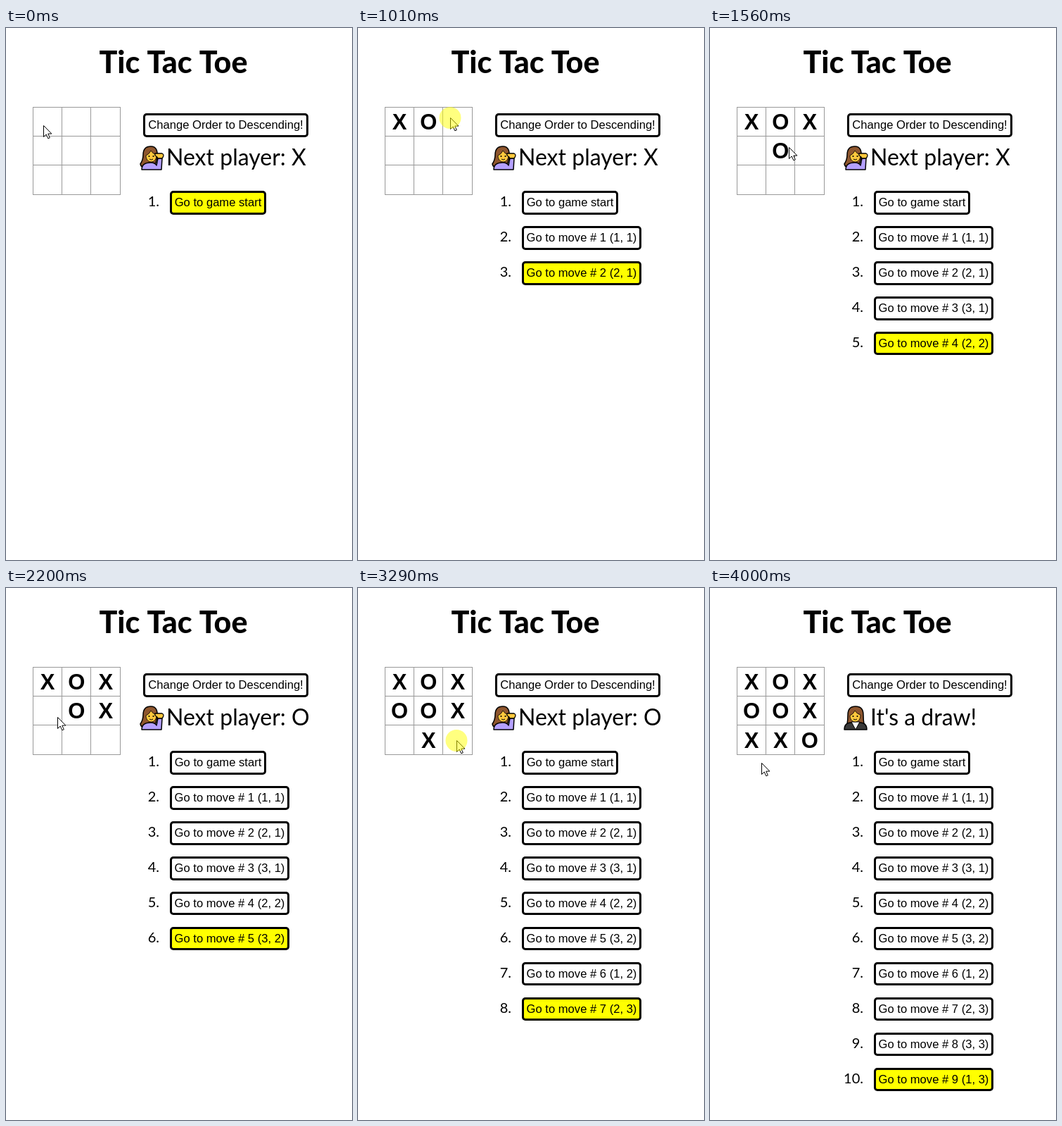
Recreate the animation shown at these times as an HTML page with a canvas. Size 492x755 px, loop 4070 ms.

```html
<!DOCTYPE html>
<html lang="en">
<head>
<meta charset="utf-8">
<title>Tic Tac Toe</title>
<style>
  html, body { margin: 0; width: 100%; height: 100%; overflow: hidden; background: #fff; }
  canvas { display: block; }
</style>
</head>
<body>
<canvas id="stage" width="492" height="755"></canvas>
<script>
const ctx = document.getElementById('stage').getContext('2d');
const LOOP = 4070, TICKS = 52, HOLD = 2, CELL = 41.4;
const ROUND = '"Century Gothic", Lato, sans-serif';
const PLAIN = 'Arial, "Liberation Sans", sans-serif';

// Pointer stops; a press holds the pointer still and plays the cell under it
const stop = (tick, x, y) => ({ tick, x, y, leave: tick });
const press = (tick, x, y) => ({
  tick, x, y, leave: tick + HOLD,
  col: Math.floor((x - 38) / CELL), row: Math.floor((y - 112) / CELL)
});
const stops = [
  stop(0, 53, 138),
  press(2, 62, 138), press(8, 105, 135), press(12, 131, 127),
  press(17, 107, 168), press(23, 138, 172),
  stop(28, 73, 183),
  press(31, 57, 175), press(36, 98, 214), press(41, 140, 216), press(47, 57, 216),
  stop(51, 73, 248)
];
const moves = stops.filter(s => s.leave > s.tick);

function pointerAt(tick) {
  const i = Math.max(1, stops.findIndex(s => s.tick >= tick));
  const a = stops[i - 1], b = stops[i];
  const u = Math.max(0, (tick - a.leave) / (b.tick - a.leave));
  const k = u * u * (3 - 2 * u);
  return [Math.round(a.x + (b.x - a.x) * k), Math.round(a.y + (b.y - a.y) * k)];
}

function text(str, x, y, font, align = 'left') {
  ctx.font = font;
  ctx.textAlign = align;
  ctx.fillStyle = '#000';
  ctx.fillText(str, x, y);
}

function box(x, y, w, h, r, fill) {
  ctx.beginPath();
  ctx.roundRect(x, y, w, h, r);
  ctx.fillStyle = fill;
  ctx.fill();
}

function button(str, x, y, w, h, fill) {
  box(x, y, w, h, 5, '#000');
  box(x + 3, y + 3, w - 6, h - 6, 2, fill);
  text(str, x + w / 2, y + 22, '16.6px ' + PLAIN, 'center');
}

function shape(d, fill, line = 1.5) {
  const p = new Path2D(d);
  ctx.fillStyle = fill;
  ctx.fill(p);
  if (line) {
    ctx.strokeStyle = '#000';
    ctx.lineWidth = line;
    ctx.lineJoin = 'round';
    ctx.stroke(p);
  }
}

function disc(x, y, r, fill) {
  ctx.beginPath();
  ctx.arc(x, y, r, 0, Math.PI * 2);
  ctx.fillStyle = fill;
  ctx.fill();
}

function face() {
  shape('M9 14 Q14 12 16 7 Q19 12 24 13 C24 19 21 23 16.5 23 C12 23 9 19 9 14 Z', '#ffc83d', 0.8);
  disc(13.5, 15, 1.1, '#000');
  disc(19.5, 15, 1.1, '#000');
  shape('M14 19 Q16.5 21 19 19', 'transparent', 1);
}

function tippingWoman() {
  shape('M16 1 C8 1 5 6 5 13 Q5 20 1 26 Q2 31 8 31 L22 28 L25 17 C26 6 23 1 16 1 Z', '#8e562e');
  shape('M3 34 C3 27 8 24 16 24 Q22 24 24 28 L26 18 H32 L31 34 Z', '#b4a0ff');
  face();
  shape('M22 11 H32 Q36 13 32 18 H26 Q25 15 22 14 Z', '#ffc83d', 1.3);
}

function judge() {
  shape('M17 1 C9 1 6 6 6 13 Q6 20 5 26 H29 Q28 20 28 13 C28 6 25 1 17 1 Z', '#8e562e');
  shape('M1 34 Q1 24 11 24 H23 Q33 24 33 34 Z', '#383838');
  shape('M11 23 L17 34 L23 23 Z', '#fff', 1);
  face();
}

function board(count) {
  ctx.fillStyle = '#999';
  for (let i = 0; i < 4; i++) {
    const d = Math.floor(i * CELL);
    ctx.fillRect(38 + d, 112, 1, 125);
    ctx.fillRect(38, 112 + d, 125, 1);
  }
  moves.slice(0, count).forEach(({ col, row }, i) => {
    text(i % 2 ? 'O' : 'X', 59 + col * CELL, Math.round(144 + row * CELL), 'bold 31px ' + PLAIN, 'center');
  });
}

function status(count) {
  const over = count === moves.length;
  ctx.save();
  ctx.translate(190, 167);
  over ? judge() : tippingWoman();
  ctx.restore();
  text(over ? "It's a draw!" : 'Next player: ' + (count % 2 ? 'O' : 'X'), 228, 195, '32px ' + ROUND);
}

function history(count) {
  for (let i = 0; i <= count; i++) {
    const top = Math.round(231.4 + i * 49.96), bottom = Math.round(264.65 + i * 49.96);
    const m = moves[i - 1];
    const label = m ? `Go to move # ${i} (${m.col + 1}, ${m.row + 1})` : 'Go to game start';
    text(i + 1 + '.', 218, top + 22, '20px ' + ROUND, 'right');
    button(label, 233, top, m ? 170 : 137, bottom - top, i === count ? '#ff0' : '#fff');
  }
}

function pointer(x, y, pressed) {
  ctx.save();
  ctx.translate(x + 0.5, y + 0.5);
  shape('M0 0 V16 L3.7 12.5 L6.3 18.3 L8.8 17.3 L6.3 11.6 H11.4 Z', '#fff', 1);
  if (pressed) disc(-0.5, 0, 15.5, 'rgba(255, 255, 0, 0.5)');
  ctx.restore();
}

function draw(ms) {
  // The screen refreshes in even ticks, slightly ahead of the clock
  const tick = Math.min(TICKS - 1, Math.floor((ms + 12) * TICKS / LOOP));
  const count = moves.filter(m => tick >= m.leave).length;
  const pressed = moves.some(m => tick >= m.tick && tick < m.leave);

  ctx.fillStyle = '#fff';
  ctx.fillRect(0, 0, 492, 755);
  text('Tic Tac Toe', 238, 64, '800 43px ' + ROUND, 'center');
  board(count);
  button('Change Order to Descending!', 195, 121, 235, 34, '#fff');
  status(count);
  history(count);
  pointer(...pointerAt(tick), pressed);
}

const start = performance.now();
function frame() {
  draw((performance.now() - start) % LOOP);
  requestAnimationFrame(frame);
}
frame();
</script>
</body>
</html>
```
